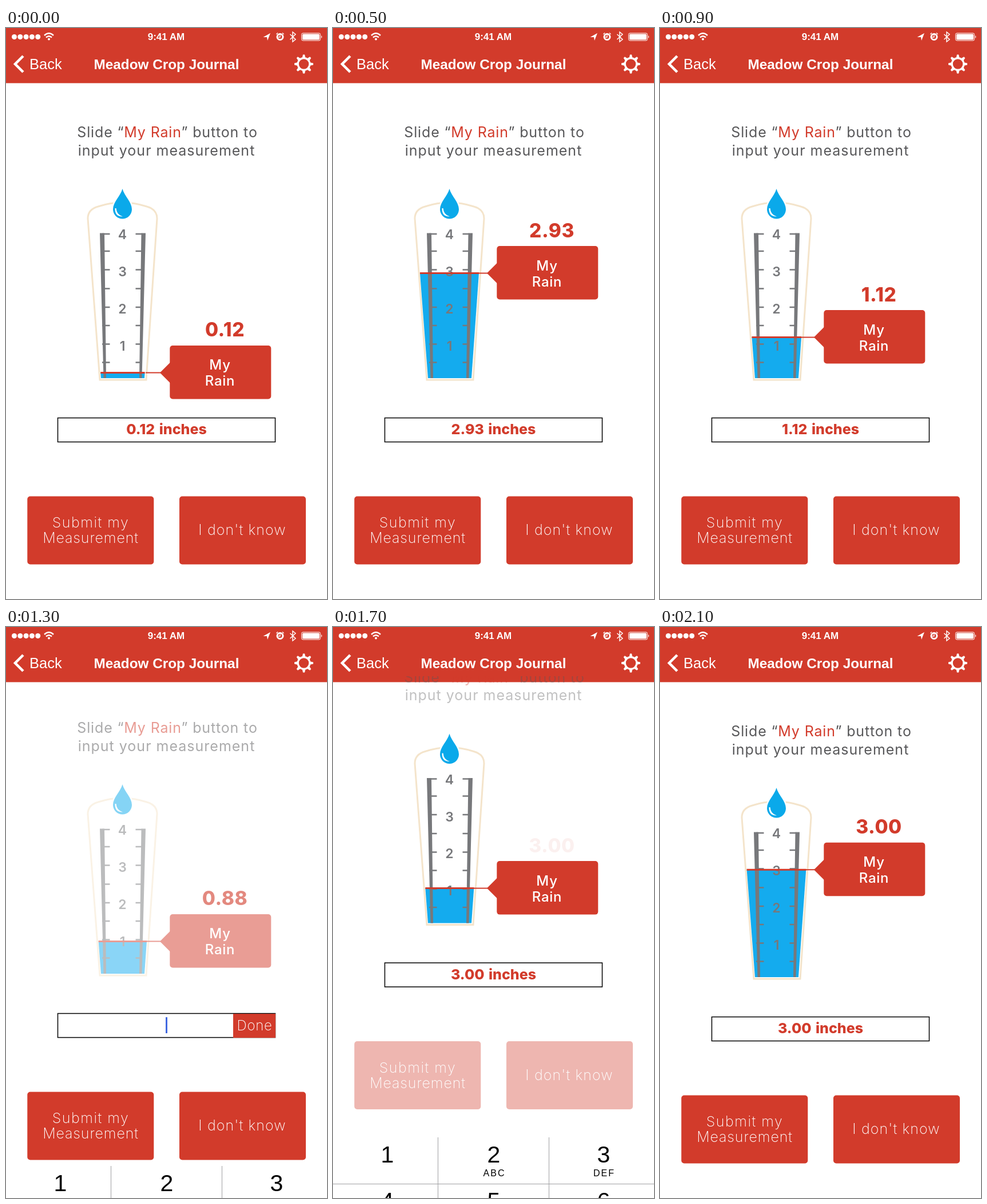
An HTML page for the animation above (2.3 s loop, 561 by 998 pixels).

```html
<!DOCTYPE html>
<html lang="en">
<head>
<meta charset="utf-8">
<title>Rain gauge</title>
<style>
  html, body { margin: 0; width: 100%; height: 100%; overflow: hidden; background: #fff; }
  svg { display: block; width: 561px; height: 998px; }
  text { font-family: Inter, "Open Sans", sans-serif; font-size: 25px; }
  .mid { text-anchor: middle; }
  .red { fill: #d23b2b; }
  .bar text, .keys text { font-family: "Liberation Sans", Arial, sans-serif; }
  .bar text { fill: #fff; }
  .intro text { fill: #58585a; letter-spacing: .85px; }
  .intro .red { fill: #d23b2b; }
  .light text { fill: #fff; font-weight: 200; letter-spacing: 1.1px; }
  .tag text { fill: #fff; font-size: 24px; font-weight: 500; letter-spacing: .7px; }
  .scale text { font-size: 23px; font-weight: 600; }
  .bold { font-weight: 700; }
  .reading { font-weight: 800; }
  #value { font-size: 33.5px; letter-spacing: .5px; }
  #entry { word-spacing: 2px; }
  .keys .digit { font-size: 41px; }
  .keys .abc { font-size: 16px; letter-spacing: 2px; }
</style>
</head>
<body>
<svg viewBox="0 0 561 998">
  <defs>
    <clipPath id="below"><rect y="86" width="561" height="912"/></clipPath>
  </defs>
  <rect width="561" height="998" fill="#fff"/>

  <g class="bar">
    <rect class="red" width="561" height="96.400"/>
    <g id="signal" fill="#fff"></g>
    <g fill="none" stroke="#fff" stroke-width="2.4">
      <path d="M67 13 Q75 5.500 83 13M70 16.500 Q75 12 80 16.500"/>
      <circle cx="75" cy="19.500" r="1" stroke-width="2"/>
    </g>
    <text class="mid bold" x="280" y="21" style="font-size:17px">9:41 AM</text>
    <path d="M449.500 16 L462 9 L457 22 L456 16 Z" fill="#fff"/>
    <g fill="none" stroke="#fff" stroke-width="2">
      <circle cx="479" cy="15.500" r="5" stroke-width="3"/>
      <path d="M479 12.500 V16 H476M472.500 11 L475 8.500M483 8.500 L485.500 11" stroke-width="1.400"/>
      <path d="M496.500 11 L506 20 L501 24 V7 L506 11 L496.500 20" stroke-width="1.500"/>
      <rect x="516.500" y="9" width="33" height="13" rx="2.500" stroke-width="1"/>
    </g>
    <rect x="518" y="10.500" width="30" height="10" rx="1.500" fill="#fff"/>
    <path d="M551 13 Q553.500 15.500 551 18 Z" fill="#fff"/>

    <path d="M30 49 L16 63 L30 77" fill="none" stroke="#fff" stroke-width="4.500"/>
    <text x="41" y="72" style="font-size:25.500px">Back</text>
    <text class="mid bold" x="280.500" y="72" style="font-size:24.300px">Meadow Crop Journal</text>
    <circle cx="520.500" cy="63" r="10.300" fill="none" stroke="#fff" stroke-width="3.200"/>
    <g id="cog" fill="#fff"></g>
  </g>

  <g clip-path="url(#below)">
    <g id="page">
      <g id="intro" class="intro">
        <text class="mid" x="282" y="191">Slide “<tspan class="red">My Rain</tspan>” button to</text>
        <text class="mid" x="280.500" y="222.500" style="letter-spacing:1px">input your measurement</text>
      </g>

      <g id="gauge">
        <path d="M164 615 L143 333 Q143 317 161 312 Q203 298 246 312 Q264 317 264 333 L245 615 Z"
              fill="#fff" stroke="#f4e4cb" stroke-width="3"/>
        <path id="water" fill="#14abee"/>
        <g class="scale" fill="#77787b">
          <path d="M164 358.500 H172 L175 612 H170.500 ZM244 358.500 H236.500 L233 612 H237.500 Z"/>
          <path id="ticks" stroke="#77787b" stroke-width="2.600"/>
          <g id="marks"></g>
        </g>
        <path d="M203.500 281 C207 294 220 304 220 317 A16.500 16.500 0 0 1 187 317 C187 304 200 294 203.500 281 Z"
              fill="#0aa9ea" stroke="#fff" stroke-width="5" paint-order="stroke"/>
        <path d="M192.500 315 Q193 326 204 329.500 Q190 330 190.500 315 Z" fill="#fff"/>
        <path id="edge" stroke="#d23b2b" stroke-width="3"/>
        <g id="tag" class="tag">
          <path d="M244 0 H272" stroke="#d23b2b" stroke-width="2"/>
          <rect class="red" x="286.300" y="-47.500" width="177" height="93.500" rx="5"/>
          <path class="red" d="M269 0 L287 -18 V18 Z"/>
          <text class="mid" x="374" y="-5">My</text>
          <text class="mid" x="374" y="23">Rain</text>
        </g>
      </g>
      <text id="value" class="mid reading red" x="382.500"></text>

      <rect x="90.500" y="681.500" width="380" height="42" fill="#fff" stroke="#000" stroke-width="1.500"/>
      <text id="entry" class="mid reading red" x="280.500" y="710"></text>
      <g id="editing" class="light">
        <rect id="caret" x="279" y="688" width="3" height="28" fill="#4169e1"/>
        <rect class="red" x="397" y="682" width="74" height="42"/>
        <text class="mid" x="434.500" y="711" style="font-size:24px;letter-spacing:.7px">Done</text>
      </g>

      <g id="buttons" class="light">
        <rect class="red" x="37.300" y="818.500" width="221" height="119" rx="5"/>
        <rect class="red" x="303" y="818.500" width="221" height="119" rx="5"/>
        <text class="mid" x="148" y="873" style="letter-spacing:1.500px">Submit my</text>
        <text class="mid" x="148" y="900" style="letter-spacing:.9px">Measurement</text>
        <text class="mid" x="413" y="886">I don't know</text>
      </g>
    </g>
  </g>

  <g id="keys" class="keys">
    <rect y="677" width="561" height="325" fill="#fff"/>
    <path d="M0 920 H183 V1002 H0 ZM378 920 H561 V1002 H378 Z" fill="#cbced7"/>
    <path d="M0 758.500 H561M0 839 H561M0 919.500 H561M183.500 677 V998M377.500 677 V998"
          stroke="#a0a0a3" stroke-width="1"/>
    <rect x="136.500" y="965.500" width="5.500" height="5.500"/>
    <path d="M453 962 L463 951 Q464 950 466 950 H483 Q486.500 950 486.500 953 V971 Q486.500 974 483 974 H466 Q464 974 463 973 Z"/>
    <path d="M468.500 957 L478.500 967 M478.500 957 L468.500 967" stroke="#fff" stroke-width="2"/>
  </g>
</svg>

<script>
const STEP = 100, LOOP = 2300;
const el = id => document.getElementById(id);

function add(parent, tag, attrs, text = "") {
  const node = document.createElementNS("http://www.w3.org/2000/svg", tag);
  for (const key in attrs) node.setAttribute(key, attrs[key]);
  node.textContent = text;
  el(parent).append(node);
}

for (let i = 0; i < 5; i++) add("signal", "circle", { cx: 14.5 + i * 10.3, cy: 15.5, r: 4.5 });

for (let a = 0; a < 360; a += 45)
  add("cog", "path", { d: "M517.5 53 L519 46.500 H522 L523.500 53 Z", transform: `rotate(${a} 520.5 63)` });

el("ticks").setAttribute("d", [360, 390, 422.5, 455.5, 488, 520, 552.5, 584.5]
  .map(y => `M168 ${y}H181.500M226.500 ${y}H238`).join(""));
for (let n = 1; n <= 4; n++)
  add("marks", "text", { x: 203.5, y: 628.5 - n * 64.8, class: "mid" }, n);

const letters = ["", "ABC", "DEF", "GHI", "JKL", "MNO", "PQRS", "TUV", "WXYZ"];
const columns = [95, 281, 473];
letters.forEach((abc, i) => {
  const x = columns[i % 3], y = 721 + Math.floor(i / 3) * 80.8;
  add("keys", "text", { x, y, class: "mid digit" }, i + 1);
  add("keys", "text", { x: x + 1, y: y + 23.5, class: "mid abc" }, abc);
});
add("keys", "text", { x: 281, y: 975, class: "mid digit" }, 0);

// Water height in inches at each step
const levels = [0.12, 0.32, 0.87, 1.68, 2.45, 2.93, 3.06, 2.77, 1.93, 1.12, 0.94,
  0.88, 0.88, 0.88, 0.88, 0.88, 0.88, 0.95, 1.35, 2.08, 2.75, 3, 3];

// While the keypad is open: page lift, keypad drop, then opacities
const rest = { lift: 0, drop: 325, gauge: 1, intro: 1, value: 1, buttons: 1 };
const open = { lift: 149.5, drop: 0, gauge: .5, intro: 0, value: 0, buttons: 0 };
const poses = {
  13: { ...rest, lift: 6, drop: 265, gauge: .5, intro: .5, value: .6 },
  14: open, 15: open, 16: open,
  17: { lift: 94.5, drop: 215, gauge: 1, intro: .37, value: .07, buttons: .37 },
  18: { lift: 28, drop: 285, gauge: 1, intro: .78, value: .55, buttons: .78 }
};

function draw(step) {
  const pose = poses[step] || rest;
  const level = levels[step];
  const y = 609.9 - level * 61.9;
  const left = 166 - (612 - y) * .0765, right = 242 + (612 - y) * .071;
  const label = (step < 17 ? level : 3).toFixed(2);
  const editing = step >= 13 && step <= 16;
  const typed = step >= 15;

  el("page").setAttribute("transform", `translate(0 ${-pose.lift})`);
  el("keys").setAttribute("transform", `translate(0 ${pose.drop})`);
  for (const id of ["gauge", "intro", "value", "buttons"]) el(id).setAttribute("opacity", pose[id]);

  el("water").setAttribute("d", `M${left} ${y}H${right}L242 612H166Z`);
  el("edge").setAttribute("d", `M${left} ${y}H${right}`);
  el("tag").setAttribute("transform", `translate(0 ${y})`);
  el("value").setAttribute("y", y - 63);
  el("value").textContent = label;
  el("entry").textContent = editing ? (typed ? "3" : "") : label + " inches";
  el("editing").style.display = editing ? "" : "none";
  el("caret").setAttribute("x", typed ? 290 : 279);
}

const start = performance.now();
let shown = -1;
function tick() {
  const step = Math.floor(((performance.now() - start) % LOOP) / STEP);
  if (step !== shown) draw(shown = step);
  requestAnimationFrame(tick);
}
tick();
</script>
</body>
</html>
```
